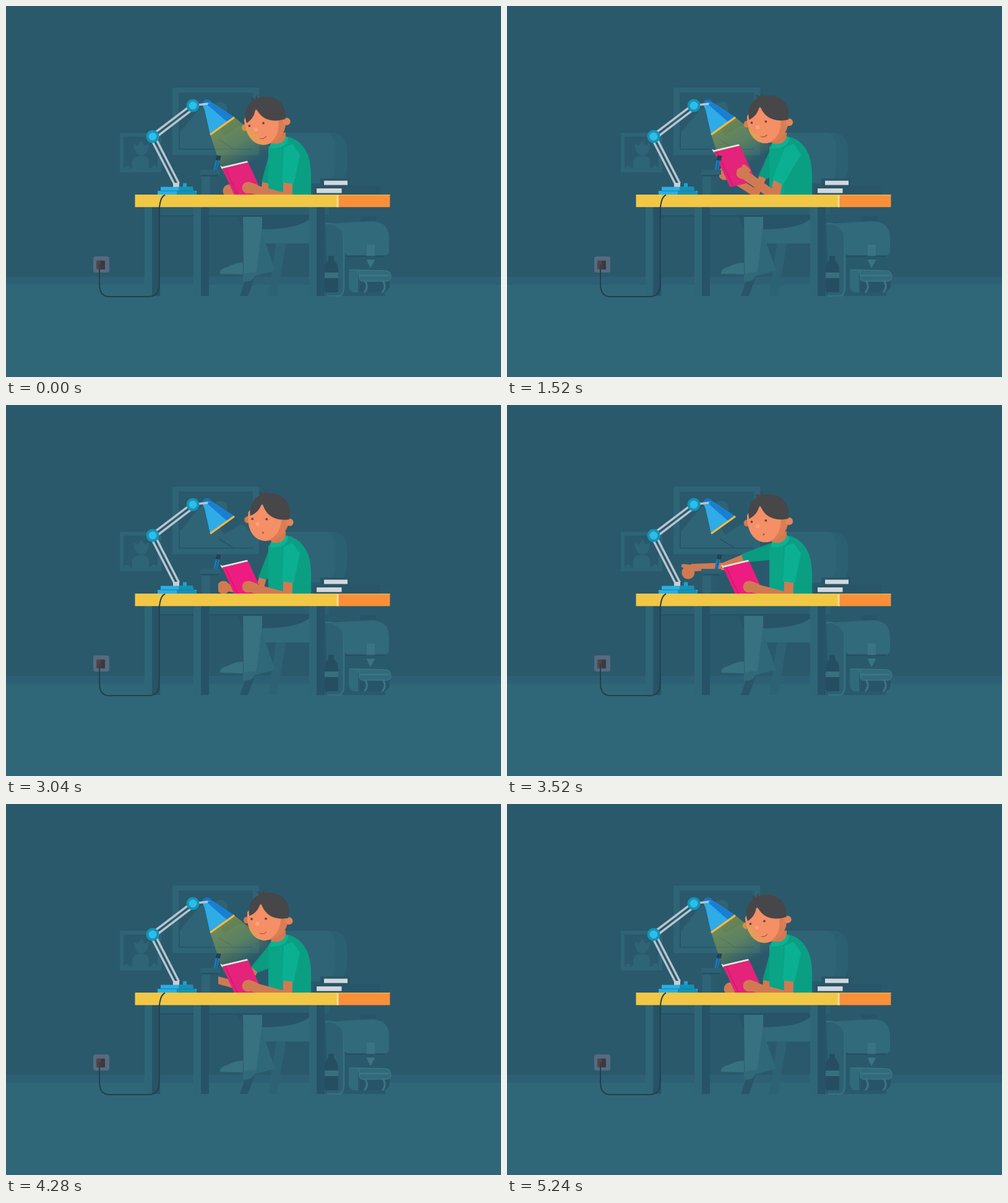
Write an HTML page that moves like this. It is 800 by 600 pixels and loops after 5640 ms.

```html
<!DOCTYPE html>
<html lang="en">
<head>
<meta charset="utf-8">
<title>Reading at the desk</title>
<style>
html, body { margin: 0; width: 100%; height: 100%; overflow: hidden; background: #2a596c; }
svg { display: block; width: 100%; height: 100%; }
.skin { fill: #d07a52; }
.limb { fill: none; stroke: #d07a52; stroke-linejoin: round; stroke-linecap: round; }
</style>
</head>
<body>
<svg viewBox="0 0 800 600">
  <defs>
    <linearGradient id="glow" gradientUnits="userSpaceOnUse" x1="350" y1="194" x2="388" y2="258">
      <stop offset="0" stop-color="#c0bf35" stop-opacity=".43"/>
      <stop offset=".5" stop-color="#c0bf35" stop-opacity=".3"/>
      <stop offset="1" stop-color="#c0bf35" stop-opacity="0"/>
    </linearGradient>
    <g id="leg">
      <path d="M0 325H12V469H0Z" fill="#2f6677"/>
      <path d="M12 325H25V469H12Z" fill="#265367"/>
    </g>
    <g id="joint">
      <circle r="10.500" fill="#1593b7"/>
      <circle r="6.500" fill="#2dbde8"/>
    </g>
    <path id="rods" d="M0 -3.500H1M0 3.500H1" vector-effect="non-scaling-stroke"/>
  </defs>

  <!-- room -->
  <rect width="800" height="600" fill="#2a596c"/>
  <rect y="438" width="800" height="13" fill="#2d6074"/>
  <rect y="451" width="800" height="149" fill="#2f6778"/>

  <!-- pictures on the wall -->
  <g fill="#2e6476">
    <path fill-rule="evenodd" d="M269 132H409V241H269ZM279 140V232H399V140Z"/>
    <path d="M280 206L311 168Q318 161 325 168L367 231H280Z"/>
    <path d="M347 213L374 196Q381 190 387 197L399 211V231H367Z"/>
    <circle cx="346" cy="167" r="12"/>
    <path fill-rule="evenodd" d="M184 205H251V269H184ZM190 211V263H245V211Z"/>
    <path d="M206 222L213 226 219 217 224 226 231 222Q231 241 218 242 207 239 206 222Z"/>
    <path d="M204 263V251Q205 243 218 242 231 243 231 252V263Z"/>
    <path d="M191 263Q193 255 201 262M234 263Q238 253 245 262V263Z"/>
  </g>
  <path d="M280 205V231.500H399M344 216L367 231" fill="none" stroke="#275265" stroke-width="1.500"/>

  <!-- chair -->
  <path d="M450 205H527Q551 207 551 232V262Q550 285 530 287H450Z" fill="#2b6072"/>
  <path d="M450 205H520Q532 210 532 232V262Q531 284 514 287H450Z" fill="#2e6476"/>
  <path d="M437 380H453L438 469H424Z" fill="#2d6274"/>
  <path d="M393 425H407L391 469H378Z" fill="#285567"/>
  <path d="M410 384V360L450 358 490 345V384Z" fill="#306a7b"/>

  <!-- trousers and shoes -->
  <path d="M373 338H490V345Q470 361 414 361L383 362Z" fill="#275467"/>
  <path d="M410 357L435 428 401 437Z" fill="#2f6879"/>
  <path d="M383 338H414V357L404 434 384 437Z" fill="#38717f"/>
  <path d="M383 434Q393 429 405 431L402 437Q398 447 383 446Z" fill="#31697a"/>
  <path d="M346 433Q345 425 358 422 371 415 383 415V434Z" fill="#38717f"/>

  <!-- backpack -->
  <path d="M516 470V360Q517 350 528 350H598V340H573V349" fill="#275567"/>
  <path d="M543 400H613V469H543Z" fill="#295a6c"/>
  <path d="M516 352Q543 350 546 374V452Q546 468 538 469H520" fill="#2c6072" stroke="#37717f" stroke-width="2.500"/>
  <path d="M518 352L592 348Q619 350 619 374V398Q617 404 609 404H556Q546 404 546 392V374Q542 356 518 352Z" fill="#316a7a"/>
  <path d="M548 404.500H612" stroke="#234d60" stroke-width="2"/>
  <path d="M583 386H596V411L589 424 583 411Z" fill="#3a7483"/>
  <path d="M582 404H597V410H582Z" fill="#285769"/>
  <path d="M572 445H620V454Q617 463 608 463H572Z" fill="#275567"/>
  <path d="M554 426H569V463H562Q554 461 554 452Z" fill="#316a7a"/>
  <path d="M556 427L568 427Q571 430 571 440 572 446 580 445H616Q622 444 622 437 621 428 612 428L569 427" fill="#316a7a" stroke="#3c7584" stroke-width="1.500"/>
  <path d="M571 436H619M580 444Q587 455 579 463M609 444Q616 455 608 463" fill="none" stroke="#3c7584" stroke-width="3"/>
  <path d="M521 404H530V411Q537 417 537 428V463H518Q513 462 513 452V428Q514 417 521 411Z" fill="#254f61"/>
  <path d="M513 431H537V440H513Z" fill="#386f7e"/>

  <!-- desk frame -->
  <path d="M224 325H522V338H224Z" fill="#2b5e70"/>
  <path d="M248 338H489V341H248Z" fill="#265366"/>
  <use href="#leg" x="224"/>
  <use href="#leg" x="303"/>
  <use href="#leg" x="490"/>

  <!-- books on the desk -->
  <path d="M508 279H556V291H605V305H498V292H508Z" fill="#285567"/>
  <path d="M514 282.500H552V289.500H514ZM502 295H542.500V302.500H502Z" fill="#d3d7de"/>

  <!-- torso -->
  <path d="M424 305V232Q426 222 434 218L453 211Q477 215 488 241 493 256 493 274V305Z" fill="#0a9f83"/>

  <!-- far arm -->
  <path id="farSkin" class="limb" stroke-width="12"/>
  <circle id="farPalm" class="skin" r="10.500"/>
  <path id="farFinger" class="limb" stroke-width="6"/>
  <path id="farSleeve" fill="#0a9b80"/>
  <path d="M424 228L446 222 449 305H424Z" fill="#0aa487"/>

  <!-- head -->
  <path class="skin" d="M428 211L452 204V214Q450 228 429 227Z"/>
  <path d="M428 222Q449 226 452 211L456 213Q455 232 427 230Z" fill="#0bb395"/>
  <g id="head">
    <path d="M408 149Q411 145 407 141 413 141 415 145 416 140 421 138 417 143 420 149Z" fill="#474649"/>
    <circle cx="390" cy="186.500" r="5.500" fill="#d9784e"/>
    <path d="M391 174C388 202 400 220 420 220 440 220 456 206 457 184L454 162H400Z" fill="#da7d54"/>
    <path d="M391 174C388 202 400 220 420 220 437 215 445 201 445 180L430 162H400Z" fill="#f48f66"/>
    <circle cx="458" cy="189.500" r="6" fill="#e5845a"/>
    <path d="M394 180C391 160 402 144 424 143 446 143 458 157 458.500 172L457 185C434 188 418 179 413 158 409 171 403 176 394 180Z" fill="#474649"/>
    <circle cx="397.500" cy="185" r="1.900" fill="#6b463c"/>
    <circle cx="420.500" cy="185" r="1.900" fill="#6b463c"/>
    <circle cx="406.500" cy="193" r="3.200" fill="#ffa27a"/>
    <path id="smile" d="M410 208Q416 211.500 421 206.500" fill="none" stroke="#b9532f" stroke-width="1.200"/>
    <circle id="gasp" cx="415" cy="207" r="1.600" fill="#b9532f"/>
  </g>

  <path id="beam" d="M330 208L369 180 470 262 460 305H362Z" fill="url(#glow)"/>

  <!-- book -->
  <path id="curl" d="M324 262L328 260.500Q331 265 337 259L339 263Q330 270 324 262Z" fill="#dfe3ea"/>
  <path id="pages" fill="#e9e6de"/>
  <path id="cover"/>
  <path id="spine" fill="none" stroke="#c9176c" stroke-width="1.200"/>

  <!-- pens and cup -->
  <path d="M340 242L347 242.500 341 266 335.500 265Z" fill="#1d78b8"/>
  <path d="M340.500 241.500L347.500 242.500 345.500 250 338.500 249Z" fill="#263d48"/>
  <path d="M343.500 243L339 265" stroke="#174d78"/>
  <path d="M316 273H343V305H316Z" fill="#2a5a6c"/>
  <path d="M316 273H330V305H316Z" fill="#2e6476"/>
  <path d="M314 265H346V273H314Z" fill="#2d6173"/>
  <path d="M316 273H343V275.500H316Z" fill="#254f62"/>

  <!-- near arm -->
  <path id="nearSkin" class="limb" stroke-width="15"/>
  <circle id="nearPalm" class="skin" r="9.500"/>
  <path id="nearFinger" class="limb" stroke-width="7"/>
  <path id="nearSleeve" fill="#0bb092"/>

  <!-- desk top -->
  <path d="M208.500 305H538V325.200H208.500Z" fill="#f2c745"/>
  <path d="M534.500 306H538V325.200H534.500Z" fill="#fbe08c"/>
  <path d="M537.500 305H620.500V325.200H537.500Z" fill="#fa8f3a"/>
  <path d="M537.500 305H620.500V306.500H537.500Z" fill="#f2b244"/>

  <!-- socket and cable -->
  <rect x="141" y="405" width="26" height="26" rx="4" fill="#566a80"/>
  <rect x="146" y="411.500" width="14" height="14.500" rx="2" fill="#51444c"/>
  <path d="M153 412H160V426H153Z" fill="#3d383f"/>
  <path d="M151 418V450Q151 470 167 470H230Q247.500 470 247.500 451V334Q248 309 257 305.500" fill="none" stroke="#244049" stroke-width="2"/>

  <!-- lamp -->
  <g stroke="#b8c4ce" stroke-width="3.500">
    <use href="#rods" transform="translate(237 212) rotate(62.800) scale(86 1)"/>
    <use href="#rods" transform="translate(237 212) rotate(-37.200) scale(82 1)"/>
  </g>
  <path d="M270 286H280V293H270Z" fill="#c6d0d8"/>
  <path d="M286 286.500H292V293H286Z" fill="#1ea3cd"/>
  <path d="M250 292.500H302V299H250ZM245 299H308V305H245Z" fill="#29b0e4"/>
  <path d="M279 292.500H300Q303 293 303 299H279ZM276 299H304Q308 300 308 305H276Z" fill="#1592b5"/>
  <path d="M250 299H303" stroke="#147fa6"/>
  <circle cx="325" cy="159" r="8" fill="#1a72c2"/>
  <path d="M318 161Q325 154 334 157L369 180 330 208 321 168Z" fill="#2fabe7"/>
  <path d="M326 160Q330 153 337 159L369 180 358 188Z" fill="#187fd3"/>
  <path d="M302 161L326 158" stroke="#b8c4ce" stroke-width="3.300"/>
  <path d="M330 208L369 180" stroke="#f9b940" stroke-width="3.200"/>
  <use href="#joint" x="237" y="211"/>
  <use href="#joint" x="302" y="161"/>
</svg>
<script>
const LOOP = 5640, LIGHT_OFF = 2040, LIGHT_ON = 3760;
const $ = id => document.getElementById(id);
const set = (id, name, value) => $(id).setAttribute(name, value);
const show = (id, on) => set(id, 'visibility', on ? 'visible' : 'hidden');

const span = (t, a, b) => Math.min(1, Math.max(0, (t - a) / (b - a)));
const smooth = u => u * u * (3 - 2 * u);
const easeOut = u => 1 - (1 - u) * (1 - u);
const ramp = (t, a, b, ease = smooth) => ease(span(t, a, b));

const add = (p, x, y) => [p[0] + x, p[1] + y];
const mix = (p, q, u) => [p[0] + (q[0] - p[0]) * u, p[1] + (q[1] - p[1]) * u];
// moves p by weighted offsets: [weight, dx, dy]
const shift = (p, ...moves) => moves.reduce((q, [w, x, y]) => add(q, w * x, w * y), p);
const line = (...pts) => 'M' + pts.map(p => p.map(v => v.toFixed(2)).join(' ')).join('L');
const poly = (...pts) => line(...pts) + 'Z';

// the sleeve ends square to the upper arm
function arm(id, shoulder, hem, half, elbow, wrist, palm, top, pit) {
  const dx = hem[0] - shoulder[0], dy = hem[1] - shoulder[1], k = half / Math.hypot(dx, dy);
  set(id + 'Skin', 'd', line(hem, elbow, wrist));
  set(id + 'Sleeve', 'd', poly(...top, add(hem, -dy * k, dx * k), add(hem, dy * k, -dx * k), pit));
  set(id + 'Palm', 'cx', palm[0]);
  set(id + 'Palm', 'cy', palm[1]);
}

function drawBook(turn, lift, on) {
  const tl = shift([349.5, 263], [turn, -4, -11], [lift, -15, -27]);
  const tr = add(tl, 42 - 20 * turn, -10 + turn);
  const br = add(tr, 26 + 10 * turn, 57 - 8 * turn);
  const bl = add(tl, 26 - 2 * turn, 57);
  const side = add(mix(tl, bl, .5), -14 * turn, 0);
  set('cover', 'd', poly(tl, tr, br, bl, side));
  set('cover', 'fill', on ? '#e4237b' : '#ee1c80');
  set('pages', 'd', poly(add(tl, -3.5, -5), add(tl, 0, -3), add(tr, -2, -2.5), tr, tl, add(tl, 0, 2)));
  set('spine', 'd', line(add(tl, 5, 0), add(side, 5, 0), add(bl, 5, -2)));
  set('curl', 'transform', `translate(${24 * (1 - turn)} ${4 * (1 - turn)})`);
  show('curl', turn > .02);
}

function drawNear(turn, lift) {
  const raised = turn + lift;
  const hem = shift([455.5, 286.5], [turn, -9.5, 0], [lift, -18, -1.5]);
  const elbow = shift([455, 311], [turn, -15, -5], [lift, -22, -3]);
  const palm = shift([391, 294], [turn, -9, -7], [lift, -11, -24]);
  arm('near', [462, 236], hem, 9.5, elbow, palm, palm, [[463, 223], [449, 229]], [475, 240]);
  set('nearFinger', 'd', line(add(palm, 2 + raised, -6 - 4 * raised), add(palm, 13 - 3 * raised, -2 - 2 * raised)));
}

function drawFar(turn, lift, reach, press) {
  const hem = shift([420, 286], [turn, -6, -1], [lift, -7, -9], [reach, -39, -38]);
  const sag = 50 * reach * (1 - reach);
  const elbow = shift([418, 305], [turn, -6, -3], [lift, -16, -2], [reach, -68, -44], [sag, 0, 1]);
  const palm = shift([361, 299], [turn, -9, -7], [lift, -9, -28], [reach, -68, -28], [press, -2, 0]);
  arm('far', [432, 232], hem, 7, elbow, add(palm, 7 * reach, -8 * reach), palm,
    [[430, 222]], [432, 275 - 25 * reach]);
  set('farFinger', 'd', line(add(palm, -8 * reach, -11 * reach), add(palm, 9 * reach, -9 * reach)));
}

function draw(t) {
  const turn = ramp(t, 20, 600) - ramp(t, 860, 1440);
  const lift = ramp(t, 860, 1520) - ramp(t, 1900, 2240);
  const up = ramp(t, 1900, 2300) - ramp(t, 4900, 5240);
  const reach = ramp(t, 2900, 3500) - ramp(t, 4100, 4680, easeOut);
  const press = Math.sin(Math.PI * span(t, 3500, 4100));
  const on = t < LIGHT_OFF || t >= LIGHT_ON;
  const tilt = -11 - 7 * turn + 6 * lift + 13 * up - 7 * reach;

  set('head', 'transform', `translate(${Math.max(0, -tilt / 5)} 0) rotate(${tilt} 440 222)`);
  drawBook(turn, lift, on);
  drawNear(turn, lift);
  drawFar(turn, lift, reach, press);
  show('beam', on);
  show('smile', on);
  show('gasp', !on);
}

const start = performance.now();
function tick() {
  draw((performance.now() - start) % LOOP);
  requestAnimationFrame(tick);
}
tick();
</script>
</body>
</html>
```
